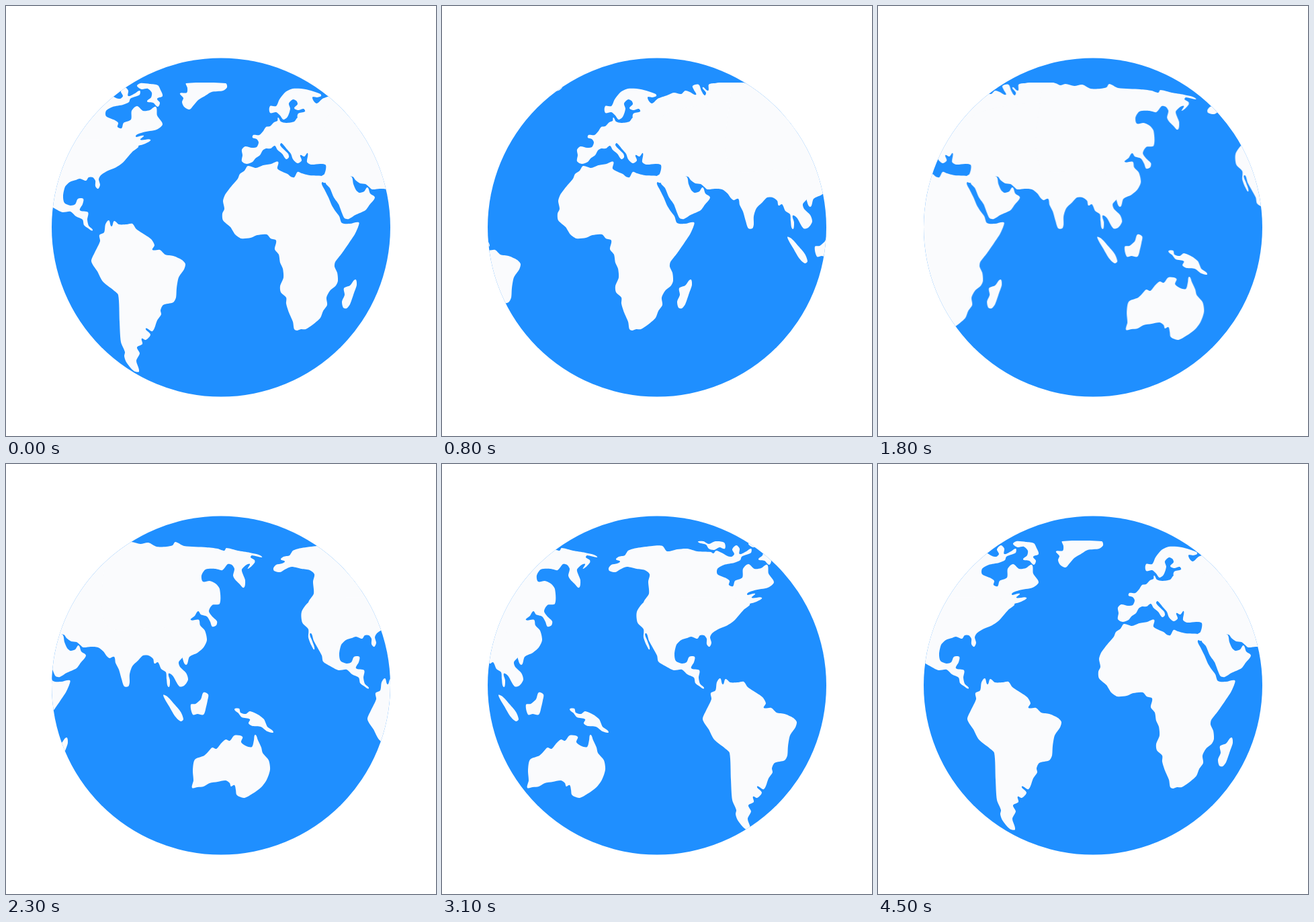
These frames come from a looping animation (640 px wide and 640 px high, 4600 ms). An HTML page:

```html
<!DOCTYPE html>
<html lang="en">
<head>
<meta charset="utf-8">
<title>Turning globe</title>
<style>
html, body { margin: 0; width: 100%; height: 100%; overflow: hidden; background: #fff; }
svg { display: block; width: 100vw; height: 100vh; }
.sea { fill: #1f8fff; }
#world { fill: #fafbfd; }
.spin { animation: spin 4600ms infinite; }
/* The map slides left in 100 ms steps, by one map width per turn. */
@keyframes spin {
  0% { transform: translateX(0); animation-timing-function: steps(8); }
  17.3913% { transform: translateX(-150px); animation-timing-function: steps(6); }
  30.4348% { transform: translateX(-264px); animation-timing-function: steps(9); }
  50% { transform: translateX(-430px); animation-timing-function: steps(8); }
  67.3913% { transform: translateX(-580px); animation-timing-function: steps(7); }
  82.6087% { transform: translateX(-715px); animation-timing-function: steps(6); }
  95.6522% { transform: translateX(-828px); animation-timing-function: steps(1); }
  97.8261%, 100% { transform: translateX(-835px); }
}
</style>
</head>
<body>
<svg viewBox="0 0 640 640">
  <defs>
    <clipPath id="disc"><circle cx="320" cy="329.5" r="252"/></clipPath>
    <clipPath id="band"><rect x="-50" y="114.7" width="950" height="440"/></clipPath>
  </defs>
  <circle class="sea" cx="320" cy="329.5" r="252"/>
  <g clip-path="url(#disc)">
    <g class="spin">
      <g id="world" clip-path="url(#band)"></g>
      <use href="#world" x="841"/>
    </g>
  </g>
</svg>
<script>
// Each coast: [horizontal shift, outline points]. Neighbouring pieces overlap.
const coasts = {
  africa: [0, `360,238 372,241 383,237 395,235 405,232 404,242 412,247 419,250 424,254 429,255
    434,247 440,249 452,252 470,253 481,257 470,263 474,273 480,285 485,297 490,305 496,313 500,323
    512,324 525,322 524,329 519,340 511,352 500,368 490,381 489,388 493,397 494,409 491,416 482,424
    477,434 478,445 472,454 468,464 457,474 446,481 439,481 433,483 429,481 427,470 421,456 417,443
    417,434 409,426 408,417 413,404 412,391 408,382 406,370 400,362 402,349 394,346 388,340 374,341
    364,345 350,346 341,340 334,329 323,319 322,309 325,302 323,290 326,281 334,270 345,257 348,250 355,245`],
  madagascar: [0, `520,407 522,415 518,427 512,444 507,450 502,449 500,440 504,430 503,420 512,416`],
  europe: [150, `201,214 206,209 216,211 223,210 226,203 223,198 217,196 218,192 227,192 233,186
    237,180 243,179 249,173 254,171 255,166 259,172 267,174 279,172 284,166 300,162 345,162 345,258
    323,263 319,254 324,250 326,237 318,235 304,236 298,232 299,219 294,224 288,222 290,230 284,234
    277,228 274,220 268,213 260,204 258,207 263,213 270,220 271,225 267,228 261,220 254,214 250,208
    244,212 237,212 232,215 228,222 221,227 217,232 208,235 201,231 202,222`],
  nordic: [150, `300,180 284,166 285,160 295,157 293,153 285,155 279,152 284,146 282,141 277,139
    271,145 273,153 269,165 263,169 258,163 252,158 243,159 243,149 252,149 257,139 266,128 277,123
    296,124 318,131 319,134 313,136 306,136 312,145 321,138 335,133 345,129 356,131 362,126 369,128
    378,132 375,125 373,119 382,117 386,126 391,133 393,129 388,121 396,126 397,117 404,115 450,115 450,180`],
  arabia: [150, `326,263 332,271 338,285 345,295 350,308 354,316 360,317 370,311 385,304 391,296
    399,285 392,279 388,270 383,276 376,278 371,274 367,265 364,254 340,250`],
  southAsia: [264, `252,254 256,259 263,264 271,265 276,269 281,273 292,272 303,273 311,279 316,286
    320,289 327,287 329,296 334,306 338,320 342,331 348,331 350,325 350,313 354,301 363,292 370,285
    378,285 385,290 387,297 392,295 397,305 404,310 405,320 408,332 410,322 408,312 414,315 424,331
    431,330 437,321 434,311 425,302 423,295 429,287 430,265 430,160 220,160 220,250`],
  eastAsia: [430, `150,130 160,115 172,115 179,118 187,116 200,119 212,117 224,123 239,123 248,121
    252,116 265,122 298,124 315,126 325,129 328,125 345,129 363,132 381,138 366,136 364,139 370,143
    370,147 360,156 363,149 358,150 351,157 353,165 356,173 354,184 347,178 341,172 338,166 340,156
    336,150 330,149 322,158 312,156 297,157 291,166 293,175 303,174 312,178 318,186 318,208 307,210
    302,219 307,227 314,234 313,240 307,242 304,235 299,227 290,224 286,219 281,226 275,232 287,232
    289,240 296,248 299,262 294,273 285,281 273,287 268,299 262,287 240,245 150,240`],
  sumatra: [430, `234,344 240,346 251,358 260,369 264,380 260,383 252,376 243,361`],
  borneo: [430, `275,358 282,357 290,350 294,340 301,343 300,352 298,361 294,373 285,372 278,373`],
  newGuinea: [430, `340,365 347,364 349,370 357,372 363,368 375,373 384,380 389,391 398,399 389,398
    379,391 367,390 361,386 363,380 351,377 346,371`],
  australia: [430, `277,482 279,471 278,456 281,440 295,434 302,427 307,422 313,424 320,416 327,410
    333,412 340,404 352,406 350,414 358,420 366,421 369,411 371,403 375,411 380,422 382,430 391,441
    393,455 388,470 380,481 368,490 355,497 347,495 343,492 342,485 340,478 335,480 333,475 327,471
    315,473 303,475 294,480 285,481`],
  northAmerica: [-126, `113,155 117,150 126,148 130,145 124,142 128,138 137,136 142,129 155,125 178,122
    193,122 200,130 215,127 230,126 245,130 265,131 269,133 273,129 281,132 290,137 296,138 300,134
    297,127 303,121 308,126 308,134 318,130 325,126 325,132 318,135 311,138 309,143 300,147 285,150
    275,156 275,164 288,170 293,174 292,180 298,182 301,174 312,169 313,156 321,149 330,156 340,155
    349,150 351,163 359,176 350,184 330,188 319,194 331,193 326,199 341,199 333,205 323,208 300,215
    175,215 165,207 173,193 172,175 174,164 167,158 155,156 140,153 130,157 123,161 114,159`],
  centralAmerica: [-126, `323,208 314,217 300,233 290,240 276,246 267,252 264,258 266,266 263,272
    259,268 259,260 255,255 249,255 245,260 236,257 230,259 221,262 214,269 211,283 213,293 222,297
    229,295 233,287 241,287 240,295 236,304 248,307 247,318 249,327 255,334 247,330 242,326 240,318
    230,313 222,306 210,307 196,300 187,294 185,285 179,274 173,263 168,252 171,264 174,276 169,269
    165,258 165,246 156,236 155,220 165,206 180,200 300,200`],
  arctic: [-126, `246,116 254,115 262,119 272,115 285,117 286,126 278,124 270,128 262,126 258,120`],
  baffin: [-126, `321,119 326,115 340,116 352,118 356,125 359,134 351,138 355,144 352,150 345,144
    336,142 342,136 343,129 337,123 328,124`],
  greenland: [0, `268,115 327,115 329,121 323,126 306,128 296,134 286,140 279,148 273,154 265,150
    262,143 264,137 259,130 269,129 270,122`],
  southAmerica: [0, `148,325 153,319 157,328 161,320 168,325 180,325 188,324 194,332 206,340 216,347
    221,356 218,363 229,363 237,370 249,372 262,378 267,384 265,392 257,404 254,420 253,434 249,441
    234,445 230,453 231,459 225,468 218,484 208,480 215,489 208,497 202,495 203,503 195,508 199,517
    194,528 198,544 190,543 179,530 176,521 177,515 171,500 169,470 167,430 160,423 144,410 136,395
    127,380 132,367 140,350 139,341 146,337`]
};

// Closed smooth curve whose handles never outgrow their own segment.
function smooth(text) {
  const pts = text.trim().split(/\s+/).map(p => p.split(',').map(Number));
  const at = i => pts[(i + pts.length) % pts.length];
  const handle = (i, len) => {
    const [ax, ay] = at(i - 1), [bx, by] = at(i + 1), [x, y] = at(i);
    const k = len / (Math.hypot(bx - ax, by - ay) || 1);
    return [x + (bx - ax) * k, y + (by - ay) * k].map(v => v.toFixed(1));
  };
  return pts.reduce((d, p, i) => {
    const q = at(i + 1);
    const len = Math.hypot(q[0] - p[0], q[1] - p[1]) * 0.25;
    return `${d}C${handle(i, len)} ${handle(i + 1, -len)} ${q}`;
  }, `M${pts[0]}`) + 'Z';
}

const world = document.getElementById('world');
for (const [shift, outline] of Object.values(coasts)) {
  const path = document.createElementNS('http://www.w3.org/2000/svg', 'path');
  path.setAttribute('d', smooth(outline));
  path.setAttribute('transform', `translate(${shift})`);
  world.append(path);
}
</script>
</body>
</html>
```
